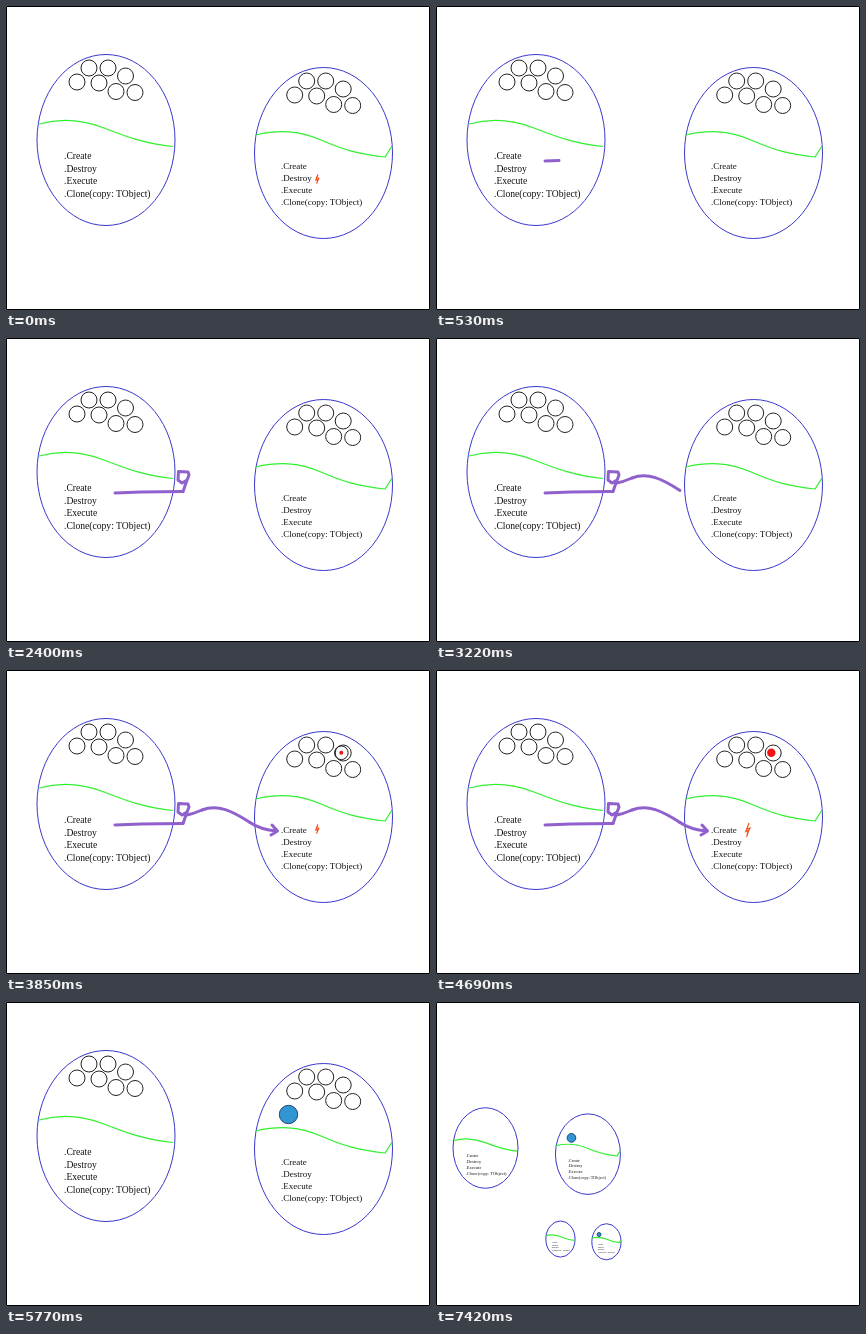
An HTML page for the animation above (8000 ms loop, 424x304 px).

```html
<!DOCTYPE html>
<html lang="en">
<head>
<meta charset="utf-8">
<title>Object cells</title>
<style>
html, body { margin: 0; width: 100%; height: 100%; overflow: hidden; background: #fff; }
svg { display: block; width: 424px; height: 304px; }
text { font-family: "Liberation Serif", "Times New Roman", serif; fill: #111; }
svg * { vector-effect: non-scaling-stroke; }
.line { fill: none; stroke-width: 1; }
.cell { stroke: #3838cc; }
.wave { stroke: #30f030; stroke-width: 1.2; }
.black { stroke: #222; }
.pen { fill: none; stroke: #9060cc; stroke-width: 3; stroke-linecap: round; stroke-linejoin: round; }
.spark { fill: none; stroke: #f4501c; stroke-width: 1.2; }
</style>
</head>
<body>
<svg id="stage" viewBox="0 0 424 304" xmlns="http://www.w3.org/2000/svg">
  <rect width="424" height="304" fill="#fff"/>
  <defs>
    <g id="cells"></g>
    <g id="blue"><circle cx="282.5" cy="112.5" r="9.2" fill="#3296d2" stroke="#204878" stroke-width="1"/></g>
  </defs>
  <g id="main">
    <use href="#cells"/>
    <g id="balls"></g>
    <use id="mainBlue" href="#blue"/>
  </g>
  <g id="copies">
    <g transform="translate(2.4 82.9) scale(.471)"><use href="#cells"/><use href="#blue"/></g>
    <g transform="translate(103.3 208.7) scale(.2115)"><use href="#cells"/><use href="#blue"/></g>
  </g>
  <g id="pens"></g>
  <path id="spark" class="spark"/>
  <circle id="ring" class="line black" cx="335.3" cy="82.8" r="6.8"/>
  <circle id="dot" cx="335.3" cy="82.8" fill="#f01414"/>
  <rect class="line" x=".5" y=".5" width="423" height="303" stroke="#000"/>
</svg>
<script>
const LOOP = 8000;
const $ = id => document.getElementById(id);

function add(parent, tag, attrs, content) {
  const el = document.createElementNS("http://www.w3.org/2000/svg", tag);
  for (const key in attrs) el.setAttribute(key, attrs[key]);
  if (content) el.textContent = content;
  parent.appendChild(el);
  return el;
}

function addCell(cx, cy, ry, wave, x, y, step, size) {
  const cells = $("cells");
  add(cells, "ellipse", { cx, cy, rx: 69, ry, class: "line cell" });
  add(cells, "path", { d: wave, class: "line wave" });
  [".Create", ".Destroy", ".Execute", ".Clone(copy: TObject)"].forEach((label, i) =>
    add(cells, "text", { x, y: y + i * step, "font-size": size }, label));
}
addCell(100, 134, 85.5, "M33 118C55 112 75 113 98 122S140 138 167 140.5", 58, 153, 12.7, 9.6);
addCell(317.5, 147, 85.5, "M249.5 129C272 124 292 124 315 134S352 148 379 151L386 140", 275, 163, 12, 9);

const balls = [[83, 62], [102, 62], [119.5, 70], [71, 76], [93, 77], [110, 85.5], [129, 86.5]];
for (const [dx, dy] of [[0, 0], [217.7, 13]])
  for (const [x, y] of balls)
    add($("balls"), "circle", { cx: x + dx, cy: y + dy, r: 8, class: "line black" });

// Pen strokes, each visible from start to end
const pens = [
  [530, 1770, "M109 155L123 154.5"],
  [1770, 5770, "M109 155L135 154L177 153.5"],
  [1770, 2400, "M177 153.5L179 147L183 138L182 135L178 133.5"],
  [2400, 5770, "M177 153.5L180 145L183 137L182 134L172.500 133.500L172 142L176 145L181 142"],
  [2820, 5770, "M179 145.500Q187 144 196 140"],
  [3220, 5770, "M196 140C212 134 226 141 244 152.500"],
  [3440, 5770, "M244 152.500Q254 159.500 271 161M266 155L271.500 161L265 165"]
].map(([start, end, d]) => ({ start, end, el: add($("pens"), "path", { d, class: "pen" }) }));

const smallSpark = y => `M312 ${y - 4.5}L309.800 ${y + 1}L312.500 ${y}L310.500 ${y + 4.5}M310 ${y - 2}L312.500 ${y - 1}L311 ${y + 3}`;
const bigSpark = "M313 153L309.800 161.500L313 160L310.500 167M311 159L314 158L311 164";

const show = (el, on) => { el.style.display = on ? "" : "none"; };
const within = (t, start, end) => t >= start && t < end;

function render(t) {
  const copied = t >= 7420;
  show($("main"), !copied);
  show($("copies"), copied);
  show($("mainBlue"), t >= 5770);
  for (const { start, end, el } of pens) show(el, within(t, start, end));

  const active = within(t, 3850, 5770);
  const large = within(t, 4690, 4910) || within(t, 5110, 5300) || t >= 5600;
  show($("spark"), t < 100 || active);
  $("spark").setAttribute("d", t < 100 ? smallSpark(173) : within(t, 4690, 4910) ? bigSpark : smallSpark(159));
  show($("dot"), active);
  $("dot").setAttribute("r", large ? 4.2 : 2);
  show($("ring"), active && !large);
}

const begin = performance.now();
function tick() {
  render((performance.now() - begin) % LOOP);
  requestAnimationFrame(tick);
}
tick();
</script>
</body>
</html>
```
